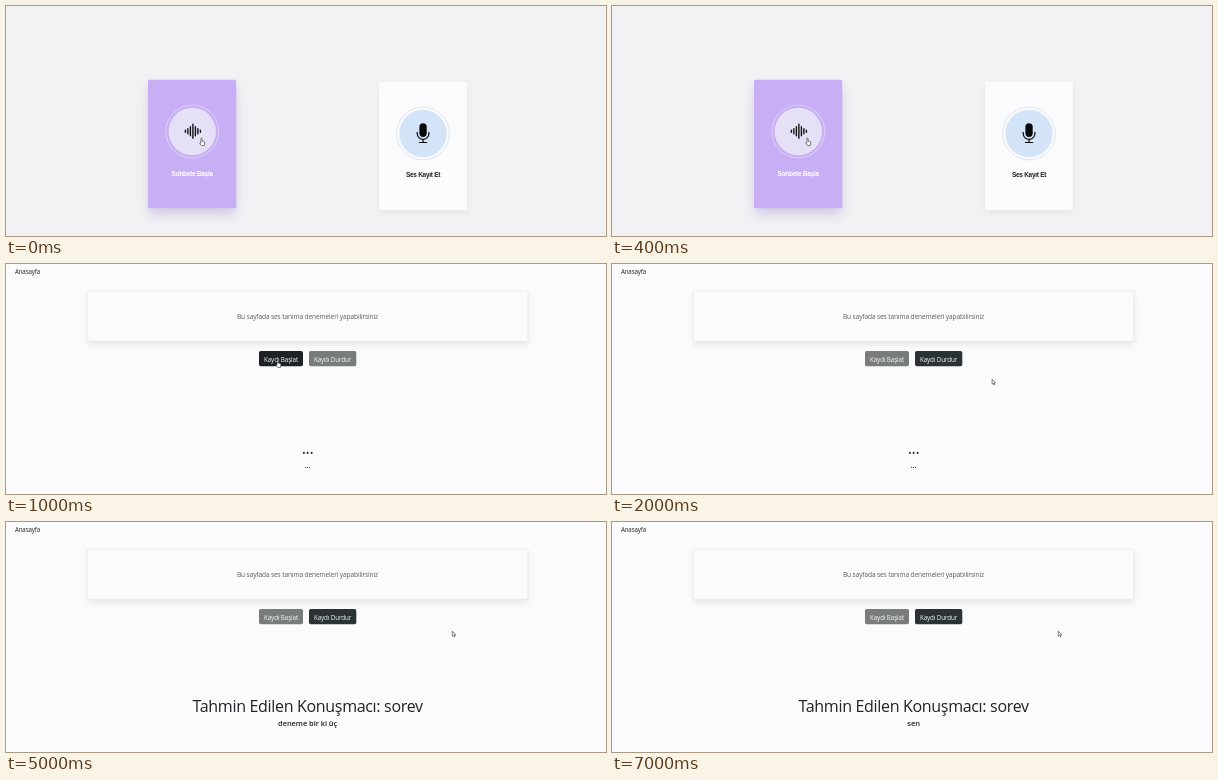
An HTML page for the animation above (8 s loop, 600x230 px).

```html
<!DOCTYPE html>
<html lang="tr">
<head>
<meta charset="utf-8">
<title>Ses tanıma</title>
<style>
  html, body { margin: 0; width: 100%; height: 100%; overflow: hidden; background: #f2f1f4; }
  svg { display: block; width: 600px; height: 230px; }
  text { text-anchor: middle; font-family: "Open Sans", "Noto Sans", sans-serif; letter-spacing: -.02em; }
  .label { font: bold 6.5px "Liberation Sans", Arial, sans-serif; letter-spacing: -.28px; }
  .button { font-size: 6.3px; fill: #f6f7f7; }
  .title { font-size: 16px; fill: #202327; }
  .heard { font-size: 7.5px; font-weight: 600; fill: #202327; letter-spacing: -.01em; }
</style>
</head>
<body>
<svg viewBox="0 0 600 230">
  <defs>
    <filter id="blur" x="-50%" y="-50%" width="200%" height="200%"><feGaussianBlur stdDeviation="6"/></filter>
    <filter id="soft" x="-10%" y="-30%" width="120%" height="160%"><feGaussianBlur stdDeviation="3"/></filter>
    <path id="hand" d="M1.6 4.6V.8q0-.7.6-.7t.6.7v2.3l2 .5q.7.3.6 1L5 7.6H2.3L.3 5.2q.2-.9 1.3-.1Z"
      fill="#fff" stroke="#333" stroke-width=".65"/>
    <path id="arrow" d="M.3.3v5l1.2-1 .8 1.7.8-.4-.8-1.6h1.5Z" fill="#fff" stroke="#333" stroke-width=".6"/>
  </defs>

  <g id="menu">
    <rect width="600" height="230" fill="#f2f1f4"/>
    <rect x="143" y="82" width="86" height="126" fill="#a9a0d0" opacity=".5" filter="url(#blur)"/>
    <path d="M143.2 73.7H228q2.3 0 2.3 2.3V201q0 1.2-1.2 1.2H143.2q-1.2 0-1.2-1.2V74.9q0-1.2 1.2-1.2Z" fill="#c8aff5"/>
    <circle cx="186.3" cy="125.5" r="26.4" fill="none" stroke="#e4d9fa" stroke-width=".8"/>
    <circle cx="186.3" cy="125.5" r="23.7" fill="#e6e0f6"/>
    <path id="wave" stroke="#111" stroke-width="1.4" stroke-linecap="round"/>
    <text class="label" x="186.2" y="169.6" fill="#fff">Sohbete Başla</text>
    <use href="#hand" x="193.3" y="132"/>

    <rect x="374" y="80" width="86" height="126" fill="#b9b7c6" opacity=".3" filter="url(#soft)"/>
    <rect x="373" y="76" width="88" height="128.3" rx="1" fill="#fbfafd"/>
    <circle cx="417" cy="127.5" r="26.4" fill="none" stroke="#d2e3ef" stroke-width=".8"/>
    <circle cx="417" cy="127.5" r="23.7" fill="#d4e4f8"/>
    <rect x="413.4" y="117.2" width="7.3" height="13.8" rx="3.65" fill="#080a0c"/>
    <path d="M411.2 126.3v1.2a5.85 5.85 0 0 0 11.7 0v-1.2M417 133.4v3M413.4 136.5h7.3"
      fill="none" stroke="#080a0c" stroke-width="1.2" stroke-linecap="round"/>
    <text class="label" x="417" y="171.3" fill="#222">Ses Kayıt Et</text>
  </g>

  <g id="recorder">
    <rect width="600" height="230" fill="#fbfafd"/>
    <text x="21.5" y="9.7" font-size="6.2" fill="#222">Anasayfa</text>
    <rect x="82" y="31" width="440" height="50" fill="#777" opacity=".15" filter="url(#soft)"/>
    <rect x="81" y="27" width="441" height="50.3" rx="1" fill="#fbfafd" stroke="#e6e6ea" stroke-width=".7"/>
    <text x="301.5" y="54.7" font-size="6.6" fill="#5b5e62">Bu sayfada ses tanıma denemeleri yapabilirsiniz</text>
    <rect id="start" x="253" y="87" width="44" height="15.2" rx="1.8"/>
    <text class="button" x="275" y="97.7">Kaydı Başlat</text>
    <rect id="stop" x="303" y="87" width="47.3" height="15.2" rx="1.8"/>
    <text class="button" x="326.6" y="97.7">Kaydı Durdur</text>
    <text class="title" id="speaker" x="301.6" y="189.8"></text>
    <text class="heard" id="heard" x="301.6" y="204"></text>
    <use id="pointer"/>
  </g>
</svg>
<script>
  const LOOP = 8000;
  const el = id => document.getElementById(id);
  const set = (id, attrs) => Object.entries(attrs).forEach(([k, v]) => el(id).setAttribute(k, v));

  set('wave', {
    d: [2, 5, 9, 14, 9, 5, 2].map((h, i) => `M${179.4 + i * 2.5} ${125.2 - h / 2}v${h}`).join('')
  });

  function pointerAt(t) {
    if (t < 2000) return ['#hand', 269.5, 95.8];
    return t < 3000 ? ['#arrow', 379.8, 114.9] : ['#arrow', 446, 108.9];
  }

  function draw(now) {
    const t = now % LOOP;
    const recording = t >= 2000;
    const recognised = t >= 5000;
    set('menu', { visibility: t < 1000 ? 'visible' : 'hidden' });
    set('recorder', { visibility: t < 1000 ? 'hidden' : 'visible' });
    set('start', { fill: recording ? '#797c7d' : '#1c2226' });
    set('stop', { fill: recording ? '#2b3236' : '#797c7d' });
    const [href, x, y] = pointerAt(t);
    set('pointer', { href, x, y });
    el('speaker').textContent = recognised ? 'Tahmin Edilen Konuşmacı: sorev' : '...';
    el('heard').textContent = t >= 7000 ? 'sen' : recognised ? 'deneme bir ki üç' : '...';
  }

  const begin = performance.now();
  function tick() {
    draw(performance.now() - begin);
    requestAnimationFrame(tick);
  }
  tick();
</script>
</body>
</html>
```
